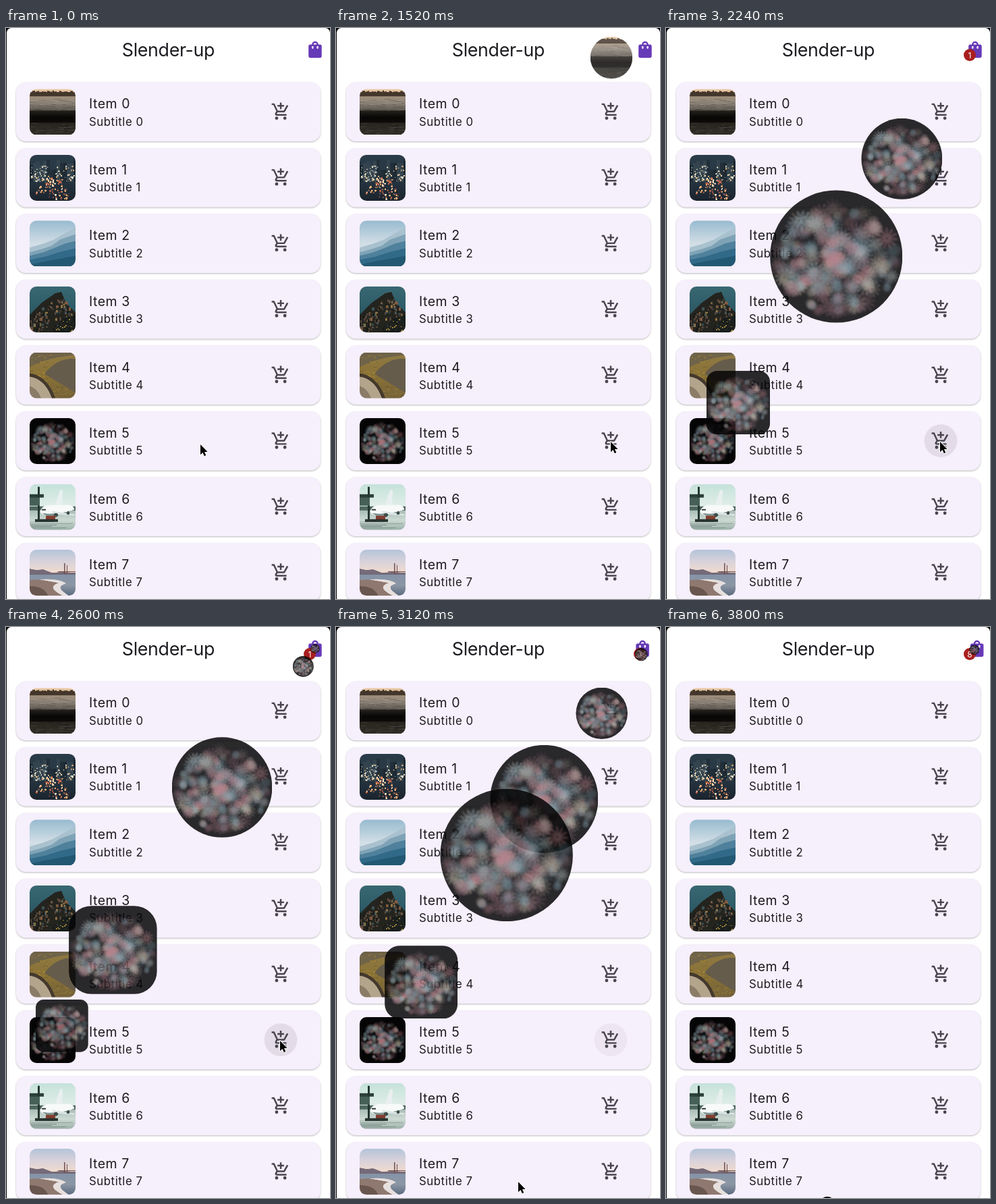
Recreate the animation shown at these times as an HTML page with a canvas. Size 480 by 846 pixels, loop 3840 ms.

```html
<!DOCTYPE html>
<html lang="en">
<head>
<meta charset="utf-8">
<style>
  html, body { margin: 0; width: 480px; height: 846px; overflow: hidden; background: #000; }
  svg, canvas { position: absolute; left: 0; top: 0; }
  text { font-family: Inter, Roboto, sans-serif; fill: #1d1b20; }
  .title { font-size: 26.8px; letter-spacing: -.35px; text-anchor: middle; }
  .item { font-size: 19.5px; letter-spacing: .5px; }
  .sub { font-size: 16.8px; letter-spacing: .55px; }
  .card { fill: #f6effc; filter: drop-shadow(0 1.2px 1.3px rgba(0, 0, 0, .28)); }
  .hover { fill: #49454f; opacity: 0; }
  .cart { fill: #49454f; }
  #badge text { font-size: 12px; fill: #fff; text-anchor: middle; }
</style>
</head>
<body>
<svg width="480" height="846">
  <defs>
    <path id="cart" d="M11 9h2V6h3V4h-3V1h-2v3H8v2h3zm-4 9a2 2 0 1 0 0 4 2 2 0 0 0 0-4zm10 0a2 2 0 1 0 0 4 2 2 0 0 0 0-4zm-9.8-3.3.9-1.7h7.5c.7 0 1.4-.4 1.7-1l3.9-7L19.4 4l-3.9 7h-7L4.3 2H1v2h2l3.6 7.6-1.4 2.4C4.5 15.4 5.5 17 7 17h12v-2H7.4z"/>
  </defs>
  <path d="M1 860V7a7 7 0 0 1 7-7H473a7 7 0 0 1 7 7V860z" fill="#fff"/>
  <text class="title" x="240.5" y="42">Slender-up</text>
  <g id="list"></g>
  <g id="bag" fill="#673ab7">
    <path transform="translate(443.3 17.3) scale(1.22)" d="M18 6h-2a4 4 0 0 0-8 0H6a2 2 0 0 0-2 2v12a2 2 0 0 0 2 2h12a2 2 0 0 0 2-2V8a2 2 0 0 0-2-2zm-8 4a1 1 0 0 1-2 0V8h2zm2-6a2 2 0 0 1 2 2h-4a2 2 0 0 1 2-2zm4 6a1 1 0 0 1-2 0V8h2z"/>
  </g>
  <g id="badge">
    <circle cx="450" cy="40" r="9" fill="#a81f1f"/>
    <text x="450" y="44.5"></text>
  </g>
</svg>
<canvas id="stage" width="480" height="846"></canvas>
<script>
const LOOP = 3840, THUMB = 68, BAG = [458, 32];
const $ = selector => document.querySelector(selector);
const cardTop = i => 80.4 + 97.53 * i;
const clamp = v => Math.max(0, Math.min(1, v));

$('#list').innerHTML = [...Array(8).keys()].map(i => `
  <g transform="translate(0 ${cardTop(i)})">
    <rect class="card" x="15" width="451" height="87.5" rx="14.5"/>
    <circle class="hover" cx="407" cy="43.5" r="24.4"/>
    <text class="item" x="123" y="39">Item ${i}</text>
    <text class="sub" x="123" y="64.3">Subtitle ${i}</text>
    <use class="cart" href="#cart" transform="translate(392.4 28.8) scale(1.22)"/>
  </g>`).join('');

// Thumbnails, drawn in a 68-unit square
let seed = 7;
const rnd = (a = 0, b = 1) => a + (b - a) * ((seed = seed * 16807 % 2147483647) / 2147483647);
const pick = list => list[Math.floor(rnd(0, list.length))];

function picture(paint) {
  const canvas = document.createElement('canvas');
  canvas.width = canvas.height = THUMB * 3;
  const g = canvas.getContext('2d');
  g.scale(3, 3);
  const rect = (color, x, y, w, h) => { g.fillStyle = color; g.fillRect(x, y, w, h); };
  const fade = (y, h, ...colors) => {
    const grad = g.createLinearGradient(0, y, 0, y + h);
    colors.forEach((c, i) => grad.addColorStop(i / (colors.length - 1), c));
    rect(grad, 0, y, THUMB, h);
  };
  const poly = (color, path) => { g.fillStyle = color; g.fill(new Path2D(path)); };
  const dot = (color, x, y, r) => { g.fillStyle = color; g.beginPath(); g.arc(x, y, r, 0, 7); g.fill(); };
  paint({ g, rect, fade, poly, dot });
  return canvas;
}

const pictures = [
  ({ rect, fade }) => { // misty field
    fade(0, 12, '#ecd0ae', '#b98c62');
    for (let x = 0; x < 68; x += 2) rect('#43362b', x, rnd(2, 5), 2.2, 9);
    fade(11, 22, '#a2917d', '#857d72', '#554f48');
    fade(32, 20, '#26221e', '#080706', '#0f0d0b');
    fade(50, 18, '#28251f', '#34302a');
    for (let i = 0; i < 150; i++) {
      const y = rnd(14, 66);
      if (y < 32 || y > 50) rect(pick(['#ffffff18', '#00000030']), rnd(-5, 65), y, rnd(4, 12), .8);
    }
  },
  ({ rect, fade, dot }) => { // city at night
    fade(0, 68, '#2b3c49', '#283744', '#1a242e');
    for (let x = 0; x < 68; x += 5) {
      const y = Math.abs(x - 32) < 6 ? 22 : rnd(4, 18);
      rect(pick(['#1d2933', '#34444f', '#222f39']), x, y, 5, 40 - y);
    }
    for (let i = 0; i < 110; i++) {
      dot(pick(['#f2e6c8', '#9aa6ab', '#d6ad78']), 34 + pick([-1, 1]) * rnd(5, 32), rnd(16, 40), rnd(.5, 1.3));
    }
    for (let i = 0; i < 85; i++) {
      const y = rnd(34, 66), spread = (y - 22) * .7;
      dot(pick(['#f0b27a', '#cf6a4e', '#ffe9c8', '#7d5548']), 34 + rnd(-spread, spread), y, rnd(.6, 1.6));
    }
  },
  ({ fade, poly }) => { // blue mountains
    fade(0, 68, '#98bbd0', '#d3dfe6', '#c3d2db');
    poly('#a9c1ce', 'M0 40L20 34 36 28 50 20 68 10V68H0z');
    poly('#7fa3b6', 'M0 47L18 42 33 37 45 28 68 20V68H0z');
    poly('#4f819c', 'M0 52L20 47 38 40 52 34 68 30V68H0z');
    poly('#316a88', 'M0 58L24 53 46 46 68 41V68H0z');
    poly('#235872', 'M0 65L30 59 68 52V68H0z');
  },
  ({ rect, fade, poly }) => { // houses on a cliff
    fade(0, 68, '#386872', '#2d5a66', '#203f49');
    poly('#24241f', 'M0 42L8 34 18 24 28 17 38 10 47 8 53 22 60 31 68 38V68H0z');
    for (let i = 0; i < 130; i++) {
      const x = rnd(0, 64), y = rnd(12 + Math.abs(x - 42) * .75, 64);
      rect(pick(['#805c42', '#57483b', '#3f5358', '#8f7547', '#3d3831', '#5f4a3b', '#191a18']), x, y, rnd(1.5, 4), rnd(2, 5));
    }
    poly('#171c1bdd', 'M36 68L48 48 68 42V68z');
    for (let i = 0; i < 14; i++) rect('#a1873c', rnd(35, 66), rnd(48, 66), 2, 1.4);
  },
  ({ rect, fade, poly }) => { // golden hillside
    fade(0, 68, '#8f7a45', '#8a7236', '#75633a');
    poly('#665c4b', 'M22 32C36 14 52 8 68 10V60C52 50 38 42 22 32z');
    poly('#6f6349', 'M0 0H68V4C45 6 22 10 0 22z');
    for (let i = 0; i < 200; i++) {
      const x = rnd(0, 68), y = rnd(3, 66);
      if (x < 30 || y > 30 + x * .45) rect(pick(['#c09a3a80', '#574b2b70', '#a9873080']), x, y, rnd(1, 4), 1.3);
    }
    poly('#b3a48c', 'M0 32C14 34 27 44 36 68H0z');
    poly('#44392d', 'M0 31C15 33 30 44 38 68H33C26 48 14 38 0 36z');
    poly('#8b7c68', 'M0 50C8 52 14 60 17 68H0z');
  },
  ({ g, rect }) => { // fireworks
    rect('#050506', 0, 0, 68, 68);
    g.lineCap = 'round';
    g.filter = 'blur(1.6px)';
    for (let i = 0; i < 260; i++) {
      const a = rnd(0, 6.28), d = rnd() ** .6;
      const x = 34 + 31 * d * Math.cos(a), y = 36 + 27 * d * Math.sin(a);
      const r = rnd(1.8, 5), rays = 11;
      g.strokeStyle = pick(['#b5737c', '#7ea0ae', '#c5bba8', '#8b5f69', '#5c818d', '#948a78']);
      g.globalAlpha = rnd(.2, .5);
      g.lineWidth = rnd(.5, 1);
      g.beginPath();
      for (let k = 0; k < rays; k++) {
        const b = k / rays * 6.283 + a;
        g.moveTo(x + r * .2 * Math.cos(b), y + r * .2 * Math.sin(b));
        g.lineTo(x + r * Math.cos(b), y + r * Math.sin(b));
      }
      g.stroke();
    }
  },
  ({ rect, fade, poly, dot }) => { // airport apron
    fade(0, 36, '#c5e2da', '#e3efe9');
    rect('#4d665f', 0, 33, 68, 6);
    fade(39, 29, '#a9bcb6', '#cddad4', '#9db1aa');
    poly('#e8efee', 'M38 30L45 9 49 9 48 32z');
    poly('#f7faf9', 'M16 40C18 33 25 31 32 31H58C64 32 66 35 66 38L40 46H24C19 46 16 44 16 40z');
    poly('#7d9290', 'M18 43C28 45 42 44 62 40L40 47H25z');
    poly('#dbe5e3', 'M32 40L67 45 66 47 38 45z');
    rect('#2f3d39', 18, 37, 6, 2);
    dot('#3f4f4b', 39, 46, 3);
    dot('#3f4f4b', 57, 43, 2.5);
    rect('#2a4039', 0, 15, 21, 5);
    rect('#24372f', 12, 4, 3, 48);
    rect('#466057', 0, 20, 15, 12);
    rect('#843d2f', 24, 47, 14, 7);
    rect('#28332f', 8, 52, 34, 4);
    for (let i = 0; i < 6; i++) rect('#71867e', 0, 56 + i * 2.2, rnd(30, 68), .7);
  },
  ({ rect, fade, poly }) => { // beach at dusk
    fade(0, 35, '#b4c4da', '#d9d2da', '#f2dccd');
    poly('#756a78', 'M0 28L10 30 20 29 33 34 48 33 68 34V39H0z');
    rect('#6f4e4e', 51, 20, 1.5, 16);
    rect('#6f4e4e', 55, 23, 1, 13);
    rect('#6f4e4e', 42, 32, 26, .8);
    fade(37, 31, '#8594a8', '#8c96a4', '#5b6b80');
    poly('#8f786f', 'M0 45C16 43 32 45 43 50 30 55 39 60 48 68H0z');
    poly('#69564f', 'M0 54C14 54 24 58 27 68H0z');
    poly('#e6dfdd', 'M14 44C36 42 50 46 54 50 40 54 45 59 58 68H49C34 60 29 54 43 49z');
  },
].map(picture);

// Flights to the bag: [item, start, duration], oldest first
const flights = [
  [0, 859, 882], [5, 1607, 1000], [5, 1766, 983], [5, 2028, 978], [5, 2304, 895],
  [5, 2482, 890], [5, 2610, 900], [5, 2672, 928], [5, 2860, 980],
];
// Pointer path: [time, x, y]
const pointer = [
  [0, 288, 617], [120, 292, 610], [620, 404, 127], [860, 406, 126], [960, 381, 266], [1120, 384, 430],
  [1400, 406, 608], [1520, 407, 613], [2240, 406, 613], [2880, 406, 613], [3120, 270, 822], [3240, 228, 860],
];

// cubic-bezier(.42, 0, .58, 1)
function easeInOut(x) {
  let lo = 0, hi = 1, s = .5;
  for (let i = 0; i < 20; i++) {
    s = (lo + hi) / 2;
    const q = 1 - s;
    if (1.26 * s * q * q + 1.74 * s * s * q + s ** 3 < x) lo = s; else hi = s;
  }
  return s * s * (3 - 2 * s);
}

function pointerAt(t) {
  const i = pointer.findIndex(key => key[0] > t);
  if (i < 0) return [0, 900];
  const [t0, x0, y0] = pointer[i - 1], [t1, x1, y1] = pointer[i];
  const k = (t - t0) / (t1 - t0), e = k * k * (3 - 2 * k);
  return [x0 + (x1 - x0) * e, y0 + (y1 - y0) * e];
}

const ctx = $('#stage').getContext('2d');
const hovers = document.querySelectorAll('.hover');
const arrow = new Path2D('M0 0V15.2L3.5 12 5.8 17.2 8.3 16.1 6 11H10.7z');

function tile(item, cx, cy, size, radius) {
  ctx.save();
  ctx.beginPath();
  ctx.roundRect(cx - size / 2, cy - size / 2, size, size, radius);
  ctx.clip();
  ctx.drawImage(pictures[item], cx - size / 2, cy - size / 2, size, size);
  ctx.restore();
}

function fly(item, p) {
  const x = 69, y = cardTop(item) + 43.5;
  const scale = p < .5 ? 1 + 4 * p : 3 - 5.6 * (p - .5);
  const radius = 10 + 24 * clamp(p / .47) ** 1.65;
  ctx.globalAlpha = .85;
  tile(item, x + (BAG[0] - x) * p, y + (BAG[1] - y) * p, THUMB * scale, radius * scale);
  ctx.globalAlpha = 1;
}

const pulse = (t, from, to, fadeOut) => .11 * clamp((t - from) / 80) * clamp(1 - (t - to) / fadeOut);

function draw(t) {
  ctx.clearRect(0, 0, 480, 846);
  pictures.forEach((_, i) => tile(i, 69, cardTop(i) + 44, THUMB, 10));

  let count = 0, since = 400;
  for (const [item, start, duration] of flights) {
    const age = t - start;
    if (age >= duration) { count++; since = age - duration; }
    else if (age >= 0) fly(item, easeInOut(age / duration));
  }
  const shake = since < 400 ? 5.5 * (1 - since / 400) * Math.sin(since / 160 * 2 * Math.PI) : 0;
  $('#bag').setAttribute('transform', `translate(${shake} 0)`);
  $('#badge').style.display = count ? '' : 'none';
  $('#badge text').textContent = count;
  hovers[0].style.opacity = pulse(t, 620, 940, 200);
  hovers[5].style.opacity = pulse(t, 1540, 3000, 250);

  ctx.save();
  ctx.translate(...pointerAt(t));
  ctx.lineWidth = 2;
  ctx.lineJoin = 'round';
  ctx.strokeStyle = '#fff';
  ctx.stroke(arrow);
  ctx.fillStyle = '#000';
  ctx.fill(arrow);
  ctx.restore();
  if (t > 3640) {
    ctx.beginPath();
    ctx.arc(239, 856, 12, 0, 7);
    ctx.fillStyle = '#000';
    ctx.fill();
  }
}

const begin = performance.now();
function tick() {
  draw((performance.now() - begin) % LOOP);
  requestAnimationFrame(tick);
}
tick();
</script>
</body>
</html>
```
